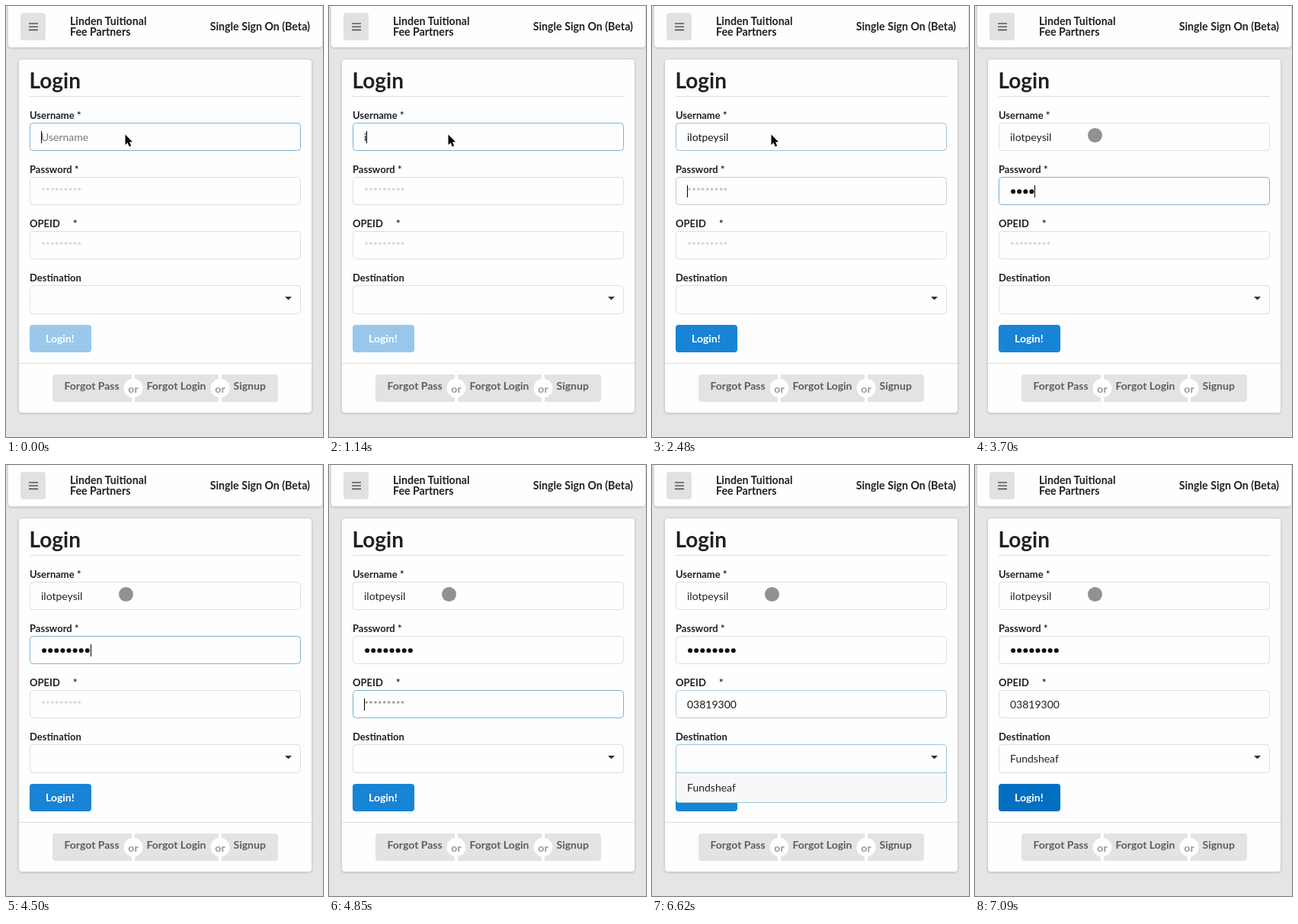
Recreate the animation shown at these times as an HTML page. Size 416 px wide and 565 px high, loop 8 s.

```html
<!DOCTYPE html>
<html lang="en">
<head>
<meta charset="utf-8">
<title>Login form</title>
<style>
  html, body { margin: 0; width: 100%; height: 100%; overflow: hidden; background: #e5e5e5; }
  svg { display: block; width: 416px; height: 565px; font-family: Lato, sans-serif; font-size: 14px; }
  text { fill: #212121; white-space: pre; }
  .label { font-size: 13px; font-weight: 700; }
  .head { font-size: 14.2px; font-weight: 700; }
  .title { font-size: 28px; font-weight: 700; }
  .button { font-weight: 700; fill: #5d5d5d; }
  .or { font-weight: 700; fill: #989898; text-anchor: middle; }
  .box { fill: #fefefe; stroke: #dedede; }
  .shade { filter: drop-shadow(0 1px 1px rgba(34, 36, 38, .16)); }
  .rule { stroke: #dcdcdc; }
</style>
</head>
<body>
<svg viewBox="0 0 416 565">
  <rect width="416" height="565" fill="#e5e5e5"/>
  <rect class="shade" x="2.5" y="-9.5" width="413" height="64" rx="4" fill="#fefefe" stroke="#d6d6d6"/>
  <rect x="19" y="9" width="33" height="36" rx="4" fill="#e1e1e1"/>
  <path d="M30 23h12M30 27.2h12M30 31.4h12" stroke="#585858" stroke-width="1.6"/>
  <text class="head" x="84" y="25">Linden Tuitional</text>
  <text class="head" x="84" y="39">Fee Partners</text>
  <text class="head" x="399" y="32" text-anchor="end">Single Sign On (Beta)</text>

  <rect class="shade" x="16.5" y="69.5" width="385" height="464" rx="4" fill="#fefefe" stroke="#cfcfd0"/>
  <text class="title" x="30.5" y="108">Login</text>
  <path class="rule" d="M31 118.5H387M17 468.5H401"/>

  <g id="fields"></g>
  <text class="label" x="31" y="361">Destination</text>
  <rect id="select" class="box" x="31.5" y="366.5" width="355" height="37" rx="4"/>
  <text id="choice" x="46" y="390">Fundsheaf</text>
  <path d="M366 381h9l-4.5 4.6z" fill="#333"/>

  <rect id="submit" x="31" y="418" width="81" height="36" rx="4"/>
  <text class="button" x="52" y="441" style="fill:#fff">Login!</text>
  <g id="menu">
    <path d="M31.5 403.5H386.5V438.5a4 4 0 0 1-4 4H35.5a4 4 0 0 1-4-4Z" fill="#f8f8f8" stroke="#96c8da"/>
    <text x="46" y="428">Fundsheaf</text>
  </g>

  <rect x="61" y="483" width="296" height="36" rx="4" fill="#e3e3e3"/>
  <g fill="#fefefe">
    <path d="M165 483h4v36h-4zM279 483h4v36h-4z"/>
    <circle cx="167" cy="501" r="12.5"/>
    <circle cx="281" cy="501" r="12.5"/>
  </g>
  <text class="or" x="167" y="507">or</text>
  <text class="or" x="281" y="507">or</text>
  <text class="button" x="76.5" y="503">Forgot Pass</text>
  <text class="button" x="184.5" y="503">Forgot Login</text>
  <text class="button" x="298.5" y="503">Signup</text>

  <path id="arrow" d="M156.5 168.5V182L159.6 179.2L161.8 184.2L164.2 183.2L162 178.3H166Z" stroke="#fff" stroke-width="1" paint-order="stroke"/>
  <circle id="wait" fill="#919191"/>
  <rect id="caret" width="1" height="16" fill="#000"/>
</svg>
<script>
const LOOP = 8000;
const LEFT = 46;
const DOT_PITCH = 8.1;
const $ = id => document.getElementById(id);

function add(parent, tag, attrs, text = '') {
  const node = document.createElementNS('http://www.w3.org/2000/svg', tag);
  for (const key in attrs) node.setAttribute(key, attrs[key]);
  node.textContent = text;
  parent.append(node);
  return node;
}

// keys: moments at which each character appears; focus: [start, end]
const fields = [
  { label: 'Username', star: 93, top: 153, hint: 'Username', value: 'ilotpeysil', focus: [-200, 2480],
    keys: [1140, 1320, 1450, 1530, 1640, 1740, 1890, 2000, 2100, 2270] },
  { label: 'Password', star: 90, top: 224, hint: '*********', secret: true, focus: [2480, 4740],
    keys: [3250, 3430, 3580, 3700, 3880, 4030, 4230, 4500] },
  { label: 'OPEID', star: 88, top: 295, hint: '*********', value: '03819300', focus: [4740, 6590],
    keys: [5120, 5300, 5450, 5570, 5710, 5830, 5970, 6180] }
];

for (const f of fields) {
  const group = add($('fields'), 'g', {});
  add(group, 'text', { class: 'label', x: 31, y: f.top - 5 }, f.label);
  add(group, 'text', { class: 'label', x: f.star, y: f.top - 5 }, '*');
  f.box = add(group, 'rect', { class: 'box', x: 31.5, y: f.top + .5, width: 355, height: 36, rx: 4 });
  f.hintNode = add(group, 'text', { x: LEFT, y: f.top + 24 }, f.hint);
  f.text = add(group, 'text', { x: LEFT, y: f.top + 24 });
  f.dots = f.secret ? f.keys.map((_, i) =>
    add(group, 'circle', { cx: LEFT + 4.1 + i * DOT_PITCH, cy: f.top + 19.2, r: 3, fill: '#111' })) : [];
}

const clamp = v => Math.max(0, Math.min(1, v));
const mix = (a, b, p) => `rgb(${a.map((v, i) => Math.round(v + (b[i] - v) * p))})`;
const grey = v => [v, v, v];
const within = (t, a, b) => t >= a && t < b;
const show = (node, on) => node.setAttribute('visibility', on ? 'visible' : 'hidden');
// Starts part way, as the first visible step of a switch does
const fade = (t, start) => t < start ? 0 : clamp((t - start + 40) / 120);

function drawField(f, t) {
  const glow = fade(t, f.focus[0]) - fade(t, f.focus[1]);
  const count = f.keys.filter(k => t >= k).length;
  f.box.style.stroke = mix(grey(222), [125, 178, 214], glow);
  f.hintNode.style.fill = mix(grey(196), grey(122), glow);
  show(f.hintNode, !count);
  f.text.style.fill = mix(grey(33), grey(10), glow);
  if (f.value) f.text.textContent = f.value.slice(0, count);
  f.dots.forEach((dot, i) => show(dot, i < count));

  if (!within(t, ...f.focus)) return;
  const width = f.secret ? count * DOT_PITCH : count ? f.text.getComputedTextLength() : 0;
  $('caret').setAttribute('x', LEFT + Math.round(width));
  $('caret').setAttribute('y', f.top + 11);
}

function draw(t) {
  fields.forEach(f => drawField(f, t));
  show($('caret'), t < 6590 && !within(t, 450, 930) && !within(t, 3070, 3250));

  const ready = clamp((t - 1140) / 110);
  const pressed = fade(t, 7000);
  $('submit').style.fill = t < 7000
    ? mix([154, 200, 236], [24, 132, 213], ready)
    : mix([24, 132, 213], [0, 111, 192], pressed);

  const open = within(t, 6590, 7000);
  $('menu').style.opacity = t < 6620 ? .5 : 1;
  show($('menu'), open);
  $('select').style.stroke = open ? '#96c8da' : '#dedede';
  show($('choice'), t >= 7000);

  show($('arrow'), t < 2830);
  show($('wait'), t >= 2830);
  const settled = t >= 3160;
  $('wait').setAttribute('cx', settled ? 157.5 : 159);
  $('wait').setAttribute('cy', settled ? 169.5 : 171);
  $('wait').setAttribute('r', settled ? 9.5 : 9);
}

const begin = performance.now();
function tick() {
  draw((performance.now() - begin) % LOOP);
  requestAnimationFrame(tick);
}
tick();
</script>
</body>
</html>
```
